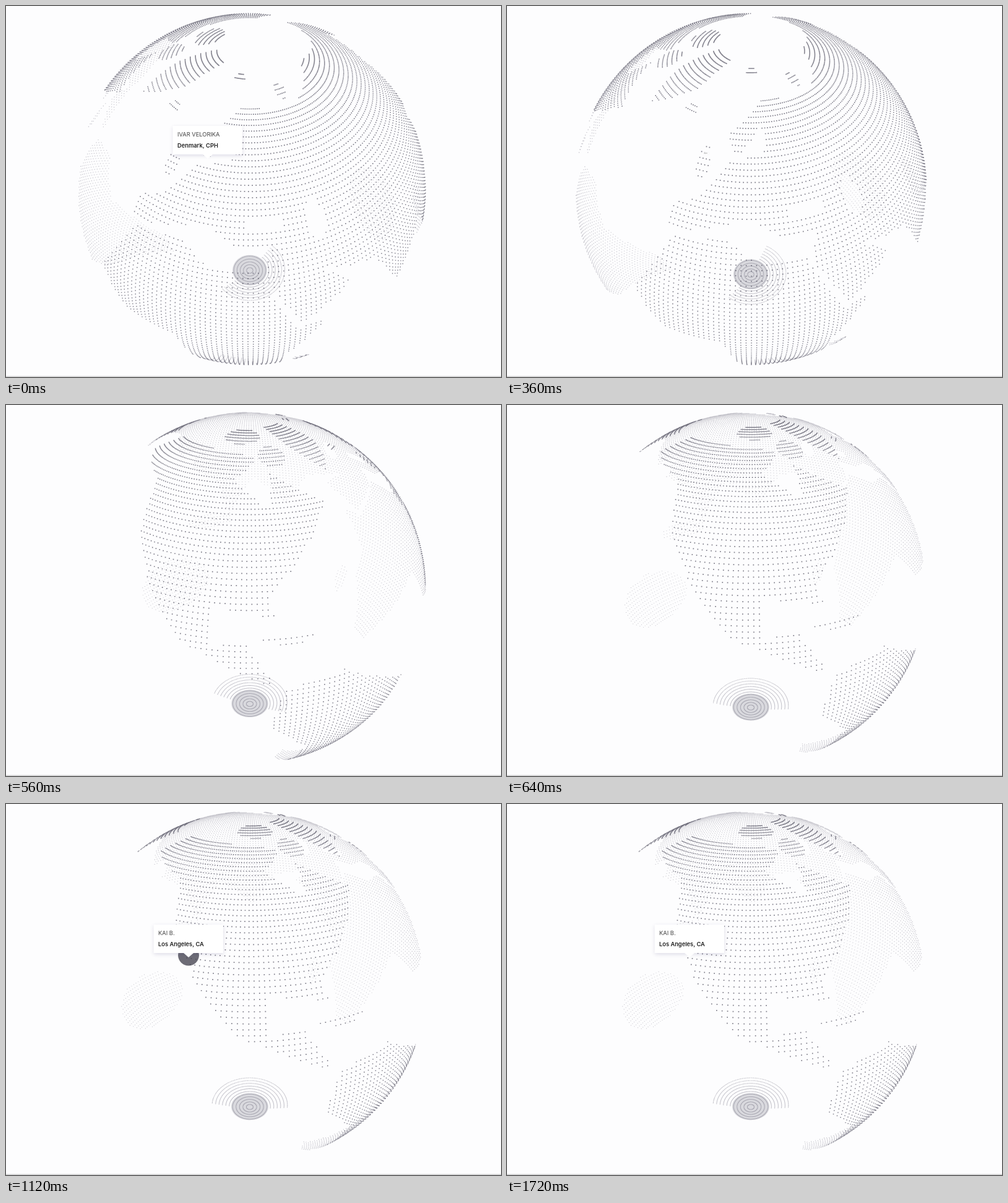
An HTML page with a canvas that plays this animation: 800x600 px, repeating every 2120 ms.

```html
<!DOCTYPE html>
<html lang="en">
<head>
<meta charset="utf-8">
<title>Dotted globe</title>
<style>
html, body { margin: 0; width: 100%; height: 100%; overflow: hidden; background: #fdfdfe; }
canvas { display: block; }
</style>
</head>
<body>
<canvas id="stage" width="800" height="600"></canvas>
<script>
const ctx = document.getElementById('stage').getContext('2d');
const LOOP = 2120, TICK = 40;
const CX = 394, CY = 296, RADIUS = 284, DIST = 2.9;
const FOCAL = RADIUS * Math.sqrt(DIST * DIST - 1);
const RAD = Math.PI / 180, STEP = 360 / 256;

const land = new Path2D(), sea = new Path2D();

// Corners are longitude, latitude pairs.
function coast(...corners) {
  const shape = new Path2D();
  for (let i = 0; i < corners.length; i += 2) shape.lineTo(corners[i], corners[i + 1]);
  shape.closePath();
  land.addPath(shape);
}

function oval(target, lon, lat, halfWidth, halfHeight) {
  target.moveTo(lon + halfWidth, lat);
  target.ellipse(lon, lat, halfWidth, halfHeight, 0, 0, 7);
}

// Eurasia
coast(-9,37, -9,43, -1,46, 8,55, 24,58, 22,65, 12,56, 5,61, 25,71, 60,69, 104,77, 140,72, 180,69, 162,52, 158,61,
  137,54, 128,36, 119,38, 121,28, 108,19, 103,2, 92,21, 77,8, 68,24, 51,29, 59,22, 44,13, 34,30, 36,37, 24,38,
  16,42, -5,37);
// Africa
coast(-6,36, 10,37, 20,31, 33,31, 43,11, 51,12, 40,-3, 40,-15, 27,-34, 18,-34, 9,4, -8,4, -17,15);
// The Americas
coast(-165,62, -156,71, -95,70, -82,67, -94,60, -79,52, -76,62, -56,52, -81,31, -80,26, -97,29, -96,19, -88,21,
  -79,8, -105,20, -124,40, -133,56);
coast(-78,8, -62,10, -35,-7, -40,-22, -66,-55, -74,-50, -70,-18, -81,-5);
// Greenland
coast(-60,82, -20,82, -25,70, -44,60, -54,70);

oval(land, 134, -25, 19, 11);   // Australia
oval(land, 112, 0, 10, 4);      // Indonesia
oval(land, 47, -19, 2.5, 6.5);  // Madagascar
oval(land, -76, 21, 7, 1.5);    // Cuba
oval(land, -2.5, 54, 3, 4);     // Britain
oval(land, -19, 65, 5, 1.5);    // Iceland
oval(land, 18, 79, 7, 1.5);     // Svalbard
oval(land, 57, 74, 5, 2.5);     // Novaya Zemlya
oval(land, -72, 68, 9, 4);      // Baffin
oval(land, -95, 77, 20, 4);     // Arctic islands
oval(sea, 35, 43, 6, 2);        // Black Sea
oval(sea, 51, 42, 3, 5);        // Caspian

function isLand(lon, lat) {
  if (lat < -60) return lat + 90 < (Math.abs(lon - 75) < 95 ? 15.5 : 8);
  return ctx.isPointInPath(land, lon, lat) && !ctx.isPointInPath(sea, lon, lat);
}

const dots = [];
for (let lat = STEP - 90; lat < 85; lat += STEP)
  for (let lon = -180; lon < 180; lon += STEP)
    if (isLand(lon, lat)) dots.push([lon * RAD, Math.sin(lat * RAD), Math.cos(lat * RAD)]);

const clamp = v => Math.min(1, Math.max(0, v));
const span = (t, from, to) => clamp((t - from) / (to - from));
const inOut = (p, power) => p < .5 ? (2 * p) ** power / 2 : 1 - (2 - 2 * p) ** power / 2;

function drawGlobe(turn) {
  const lon0 = (30 - 131 * turn) * RAD, tilt = (51.2 - 20.2 * turn) * RAD;
  const sinT = Math.sin(tilt), cosT = Math.cos(tilt);
  const project = (lon, sinLat, cosLat) => {
    const side = cosLat * Math.sin(lon - lon0), fore = cosLat * Math.cos(lon - lon0);
    const z = sinLat * sinT + fore * cosT, k = FOCAL / (DIST - z);
    return [CX + side * k, CY - (sinLat * cosT - fore * sinT) * k, z];
  };

  // The far pole reads as a pale disc.
  ctx.beginPath();
  for (let a = 0; a < 360; a += 5)
    ctx.lineTo(...project(a * RAD, -Math.cos(7.6 * RAD), Math.sin(7.6 * RAD)).slice(0, 2));
  ctx.fillStyle = 'rgba(150,148,162,.35)';
  ctx.fill();

  // One path per side, so that crowded dots merge without darkening.
  const far = new Path2D(), near = new Path2D();
  for (const dot of dots) {
    const [x, y, z] = project(...dot), size = 3.3 / (DIST - z);
    (z > 1 / DIST ? near : far).rect(x - size / 2, y - size / 2, size, size);
  }
  ctx.fillStyle = 'rgba(90,88,105,.38)';
  ctx.fill(far);
  ctx.fillStyle = 'rgba(60,58,76,.64)';
  ctx.fill(near);
}

function drawCard(left, top, originX, scale, tipX, name, place) {
  if (scale <= 0) return;
  const bottom = top + 46;
  ctx.save();
  ctx.translate(originX, bottom);
  ctx.scale(scale, scale);
  ctx.translate(-originX, -bottom);
  ctx.fillStyle = '#fff';
  ctx.shadowColor = 'rgba(60,50,110,.16)';
  ctx.shadowBlur = 6 * scale;
  ctx.shadowOffsetY = 2 * scale;
  ctx.fillRect(left, top, 112.5, 46);
  ctx.shadowColor = 'transparent';
  ctx.beginPath();
  ctx.moveTo(tipX + 8, bottom);
  ctx.lineTo(tipX, bottom + 7);
  ctx.lineTo(tipX - 8, bottom);
  ctx.fill();
  ctx.fillStyle = '#444';
  ctx.font = '9.3px Inter, sans-serif';
  ctx.fillText(name, left + 7.5, top + 16.5);
  ctx.fillStyle = '#222';
  ctx.font = '600 9.3px Inter, sans-serif';
  ctx.fillText(place, left + 7.5, top + 34.5);
  ctx.restore();
}

function drawMarker(x, y, r, alpha) {
  ctx.fillStyle = `rgba(70,68,80,${alpha})`;
  ctx.beginPath();
  ctx.arc(x, y, r, 0, 7);
  ctx.fill();
}

function draw(t) {
  ctx.fillStyle = '#fdfdfe';
  ctx.fillRect(0, 0, 800, 600);
  ctx.fillStyle = '#d2d2d4';
  ctx.fillRect(0, 598.5, 800, 1.5);
  drawGlobe(inOut(span(t, 195, 730), 3.3));

  drawCard(269.5, 194, 322, 1 - inOut(span(t, 187, 403), 2), 326, 'IVAR VELORIKA', 'Denmark, CPH');
  if (t > 745) {
    const grow = 1 - 2 ** (-10 * span(t, 745, 1125));
    const fade = (1 - span(t, 1300, 1720)) ** 3;
    drawMarker(295 + 35 * (1 - grow), 244.5, 17 * grow * grow, .78 * fade);
    drawCard(238.5, 195, 330, grow, 295, 'KAI B.', 'Los Angeles, CA');
  }
}

let shown = -1;
function loop() {
  const t = Math.floor(performance.now() % LOOP / TICK) * TICK;
  if (t !== shown) draw(shown = t);
  requestAnimationFrame(loop);
}
loop();
</script>
</body>
</html>
```
